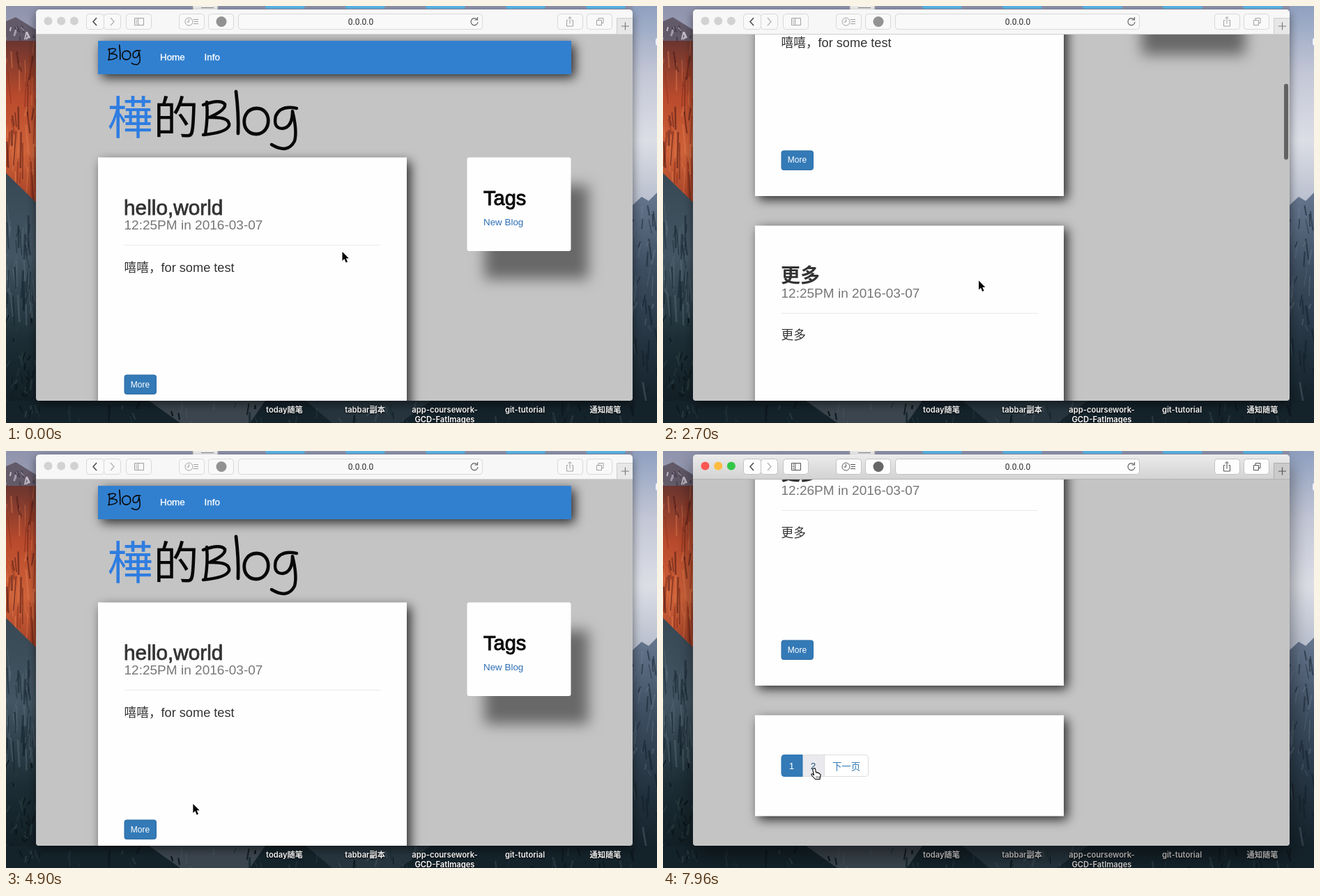
These frames come from a looping animation (934x599 px, 8000 ms). An HTML page with a canvas:

```html
<!DOCTYPE html>
<html lang="zh">
<head>
<meta charset="utf-8">
<title>Blog</title>
<style>
  html, body { margin: 0; width: 100%; height: 100%; overflow: hidden; }
  canvas { display: block; }
</style>
</head>
<body>
<canvas id="stage" width="934" height="599"></canvas>
<script>
const ctx = document.getElementById('stage').getContext('2d');
const CJK = '"Noto Sans CJK SC", "Noto Sans CJK TC", "Noto Sans CJK JP", sans-serif';
const SANS = '"Liberation Sans", ' + CJK;
const LOOP = 8000, ACTIVE_AT = 7750;
const LINK = '#337ab7';

// Stepped motion: [start, end, steps, value, easing power]
const SCROLL = [
  [0, 0, 1, [0]],
  [1290, 1580, 5, [33]],
  [1720, 2500, 8, [300]],
  [2590, 2880, 4, [700], 4.18],
  [3270, 3970, 7, [0], 3.13],
  [5780, 5950, 2, [865.5], 1.5],
  [6040, 6510, 6, [1938], 0.55],
];
const POINTER = [
  [0, 0, 1, [482.5, 353]],
  [480, 480, 1, [475, 359]],
  [630, 630, 1, [453, 394.5]],
  [4210, 4390, 3, [277, 503]],
  [4900, 5360, 9, [199.5, 538]],
  [6630, 6720, 2, [230, 432]],
  [6950, 7510, 11, [214, 455]],
];

function track(segments, t) {
  let value = segments[0][3];
  for (const [start, end, steps, target, power = 1] of segments) {
    if (t < start) break;
    const step = t >= end ? steps : 1 + Math.floor((t - start) / (end - start) * (steps - 1));
    const u = (step / steps) ** power;
    value = value.map((v, i) => v + (target[i] - v) * u);
  }
  return value;
}

function text(str, x, y, size, color, { family = SANS, weight = 400, align = 'left', thicken = 0 } = {}) {
  ctx.font = `${weight} ${size}px ${family}`;
  ctx.textAlign = align;
  ctx.fillStyle = ctx.strokeStyle = color;
  ctx.fillText(str, x, y);
  if (thicken) {
    ctx.lineWidth = thicken;
    ctx.strokeText(str, x, y);
  }
}

function box(x, y, w, h, r, fill, stroke) {
  ctx.beginPath();
  ctx.roundRect(x, y, w, h, r);
  if (fill) { ctx.fillStyle = fill; ctx.fill(); }
  if (stroke) { ctx.strokeStyle = stroke; ctx.lineWidth = 1; ctx.stroke(); }
}

function shadowBox(x, y, w, h, r, fill, dx = 5, dy = 5, blur = 15, color = '#2a2a2a') {
  ctx.save();
  Object.assign(ctx, { shadowOffsetX: dx, shadowOffsetY: dy, shadowBlur: blur, shadowColor: color });
  box(x, y, w, h, r, fill);
  ctx.restore();
}

function line(d, color, width = 1) {
  ctx.strokeStyle = color;
  ctx.lineWidth = width;
  ctx.stroke(new Path2D(d));
}

function shape(d, color) {
  ctx.fillStyle = color;
  ctx.fill(new Path2D(d));
}

function vertical(y0, y1, ...colors) {
  const g = ctx.createLinearGradient(0, y0, 0, y1);
  colors.forEach((c, i) => g.addColorStop(i / (colors.length - 1), c));
  return g;
}

function circle(x, y, r, color) {
  box(x - r, y - r, 2 * r, 2 * r, r, color);
}

function lettering(x, y, scale) {
  ctx.save();
  ctx.translate(x, y);
  ctx.scale(scale, scale);
  ctx.lineCap = ctx.lineJoin = 'round';
  line('M8 18Q10 40 6 64M3 22Q27 13 34 21Q36 29 12 40Q42 39 40 52Q36 62 3 65', '#080808', 4.5);
  line('M50 3Q54 35 53 63M79 27C56 28 56 64 79 64C102 63 102 26 79 27', '#080808', 4.8);
  line('M137 27Q114 22 107 38Q103 56 117 56Q131 54 131 31Q138 60 134 74Q124 93 101 79', '#080808', 4.5);
  ctx.restore();
}

function streaks(random, count, x, y, w, h, length, colors) {
  for (let i = 0; i < count; i++) {
    const sx = x + random() * w, sy = y + random() * h, len = length * (0.3 + random());
    line(`M${sx} ${sy}l${(random() - 0.5) * 10} ${len}`, colors[i % colors.length], 1 + random() * 2);
  }
}

function wallpaper() {
  let seed = 7;
  const random = () => (seed = seed * 16807 % 2147483647) / 2147483647;
  ctx.fillStyle = vertical(0, 599, '#8f93ac', '#b4b9ca', '#55677a', '#1d303b', '#101d24');
  ctx.fillRect(0, 0, 934, 599);

  shape('M0 22L14 16L43 34V70H0Z', '#635a69');
  streaks(random, 14, 0, 18, 43, 30, 10, ['#a39bae', '#4b4351', '#c7bfca']);
  ctx.fillStyle = vertical(50, 290, '#6b352f', '#b94a2c', '#cf6239', '#9e3d24');
  ctx.fillRect(0, 50, 43, 240);
  streaks(random, 50, 0, 50, 43, 190, 42, ['rgba(75,26,22,.55)', 'rgba(226,125,80,.45)', 'rgba(142,48,27,.6)']);
  shape('M0 240L43 282V599H0Z', vertical(240, 599, '#384855', '#435562', '#1c2d35', '#0e1a20'));
  streaks(random, 45, 0, 285, 40, 150, 36, ['rgba(20,35,45,.55)', 'rgba(104,122,135,.35)']);
  streaks(random, 40, 0, 435, 43, 155, 12, ['#0c171c', '#24363a']);

  ctx.fillStyle = vertical(0, 290, '#8fa0c0', '#c3c7d6', '#dcdee6', '#b5bccb');
  ctx.fillRect(899, 0, 35, 290);
  shape('M899 286L912 274L922 280L934 268V599H899Z', vertical(270, 599, '#66768e', '#3d4d60', '#22323e', '#0f1c23'));
  streaks(random, 40, 899, 285, 35, 265, 24, ['rgba(15,28,38,.5)', 'rgba(117,132,150,.3)']);

  ctx.fillStyle = '#14222a';
  ctx.fillRect(0, 567, 934, 32);
  shape('M205 567H372L350 599H250Z', '#3b454d');
  shape('M430 567H610L565 599H468Z', '#26343d');
  streaks(random, 70, 0, 567, 934, 30, 14, ['#0d181e', 'rgba(90,105,115,.28)', '#1c2d34']);

  // Desktop icons peeking out around the window
  for (let i = 0; i < 5; i++) box(372.5 + i * 115, -4, 56, 8, 1, '#5bb8ea');
  box(268, -4, 36, 12, 0, '#f2f2f2', '#aaa');
  line('M280 2.5H298', '#888');
  box(932, 46, 6, 11, 3, '#eef');
}

function labels(active) {
  const color = active ? '#d6d6d6' : '#fff';
  const names = [['today随笔', 399.5], ['tabbar副本', 515], ['app-coursework-', 629.5],
    ['git-tutorial', 744.5], ['通知随笔', 860], ['GCD-FatImages', 629.5, 598]];
  ctx.save();
  Object.assign(ctx, { shadowColor: '#000', shadowBlur: 3, shadowOffsetY: 1 });
  for (const [name, x, y = 584] of names)
    text(name, x, y, 11.2, color, { family: 'Inter, ' + CJK, weight: 600, align: 'center' });
  ctx.restore();
}

function post(index) {
  const y = 217.5 + index * 420;
  shadowBox(132, y, 443, 377.5, 0, '#fefefe');
  const first = index === 0;
  text(first ? 'hello,world' : '更多', 169, y + 82, first ? 29.8 : 28, '#333',
    first ? { thicken: 0.8 } : { weight: 700 });
  text(`12:${index < 4 ? 25 : 26}PM in 2016-03-07`, 169.5, y + 103.5, 19.05, '#777');
  line(`M169.5 ${y + 126}H537.5`, '#e9e9e9');
  text(first ? '嘻嘻，' : '更多', 169.5, y + 164, 17.7, '#333');
  if (first) text('for some test', 222.5, y + 164, 18.2, '#333');
  box(170, y + 312.5, 45.5, 27.5, 3, LINK, '#2e6da4');
  text('More', 192.5, y + 330, 12, '#fff', { align: 'center' });
}

function pagination(hover) {
  const y = 2317.5;
  shadowBox(132, y, 443, 145, 0, '#fefefe');
  box(170, y + 57, 124.5, 31, 4, '#fff', '#ddd');
  if (hover) box(200, y + 57, 31.5, 31, 0, '#eaeaee', '#ddd');
  line(`M231.5 ${y + 57}v31`, '#ddd');
  box(170, y + 57, 30, 31, [4, 0, 0, 4], LINK, LINK);
  text('1', 184.5, y + 77.5, 13.5, '#fff', { align: 'center' });
  text('2', 215.5, y + 77.5, 13.5, hover ? '#23527c' : LINK, { align: 'center' });
  text('下一页', 263, y + 78, 13.4, LINK, { align: 'center' });
}

function page(scroll, hover) {
  ctx.save();
  ctx.beginPath();
  ctx.roundRect(43, 40, 856, 527, [0, 0, 4, 4]);
  ctx.clip();
  ctx.fillStyle = '#c4c4c4';
  ctx.fillRect(43, 40, 856, 527);
  ctx.translate(0, -scroll);

  shadowBox(132, 50, 679, 48, 0, '#3180d0');
  lettering(145.5, 55, 0.345);
  text('Home', 221, 78, 13.4, '#fff', { thicken: 0.3 });
  text('Info', 284.5, 78, 13.4, '#fff', { thicken: 0.3 });

  text('樺', 145.5, 183.5, 65, '#2f7de1', { family: CJK });
  text('的', 211.5, 183.5, 65, '#080808', { family: CJK });
  lettering(280, 120, 1);

  shadowBox(661.5, 217.5, 149, 134.5, 3, '#fefefe', 25, 40, 20, 'rgba(0,0,0,.47)');
  text('Tags', 685, 286, 29, '#0a0a0a', { thicken: 0.9 });
  text('New Blog', 685, 315, 13.4, '#2d6fb5');

  for (let i = 0; i < 5; i++) post(i);
  pagination(hover);
  ctx.restore();
}

function toolbar(active) {
  const ink = active ? '#505050' : '#a0a0a0';
  const fill = active ? '#fdfdfd' : '#f9f9f9', edge = active ? '#c2c2c2' : '#d8d8d8';
  box(43, 5, 856, 35.5, [5, 5, 0, 0], active ? vertical(5, 40, '#ebebeb', '#d3d3d3') : '#f7f7f7');
  line('M43 40.5H899', active ? '#b3b3b3' : '#d0d0d0');

  ['#fc5753', '#fdbc40', '#33c748'].forEach((c, i) => circle(60.5 + 18.7 * i, 21.5, 6, active ? c : '#d2d2d2'));
  const buttons = [[115.5, 25], [140.5, 24], [172.5, 36], [248.5, 36], [290.5, 36], [333.5, 350], [791.5, 36], [833.5, 36]];
  for (const [x, w] of buttons) box(x, 11.5, w, 22, 4, fill, edge);

  line('M130 17l-5 5.5l5 5.5', '#484848', 1.5);
  line('M150 17l5 5.5l-5 5.5', '#b5b5b5', 1.4);
  line('M184.5 17.5h13v10h-13zM189.5 17.5v10M186 20h2M186 22.5h2M186 25h2', ink);
  line('M268 22.5a5.5 5.5 0 1 0 -11 0a5.5 5.5 0 1 0 11 0M262.5 19v4h-3M269 19.5h7M270 22.5h6M269 25.5h7', ink);
  circle(309, 22.5, 7.5, active ? '#666' : '#929292');
  text('0.0.0.0', 509, 27, 12, '#2b2b2b', { family: 'Roboto, sans-serif', align: 'center' });
  line('M675.5 19a5 5 0 1 0 1.5 4M676.5 16v4h-4', '#606060', 1.2);
  line('M806.5 20.5h-2v8.5h9v-8.5h-2M809 25.5v-10M806.5 18l2.5-2.5l2.5 2.5', ink);
  line('M847.5 20.5h7v7h-7zM850 20v-2.5h7v7h-2.5', ink);

  box(877, 17, 22, 23, 0, active ? '#cbcbcb' : '#e7e7e7');
  line('M876.5 40V17.5H899', active ? '#aeaeae' : '#cfcfcf');
  line('M883 29H894M888.5 23.5V34.5', active ? '#555' : '#7b7b7b', 1.2);
}

function scrollbar(scroll, t) {
  const visible = (on, off) => t < on ? 0 : Math.max(0, Math.min(1, (off - t) / 165));
  const alpha = Math.max(visible(1290, 4670), visible(5780, 7510));
  if (alpha) box(891, 43 + scroll * 0.2137, 6, 109, 3, `rgba(0,0,0,${0.5 * alpha})`);
}

function pointer(x, y, hand) {
  ctx.save();
  ctx.translate(x, y);
  ctx.lineJoin = 'round';
  if (hand) {
    const d = 'M2 1Q4 0 4.6 2L5.6 7Q7.5 6 8 7.5Q10 7 10.3 8.7Q12.4 8.6 12 11L11 16.5H4.5L-1 10.5Q-1.5 8 1 9L2.5 10.5L.7 2.5Z';
    shape(d, '#fff');
    line(d, '#000', 1.1);
    line('M6 12v3M8 12v3M10 12v3', '#333', 0.7);
  } else {
    const d = 'M0 0V13L3 10.2L5.2 15.5L7.5 14.5L5.3 9.4H9.3Z';
    line(d, '#fff', 2.2);
    shape(d, '#000');
  }
  ctx.restore();
}

function draw() {
  const t = performance.now() % LOOP;
  const active = t >= ACTIVE_AT;
  const [scroll] = track(SCROLL, t);
  const [x, y] = track(POINTER, t);
  wallpaper();
  labels(active);
  shadowBox(43, 5, 856, 562, 5, '#c4c4c4', 0, active ? 12 : 5, active ? 28 : 14, 'rgba(0,0,0,.5)');
  page(scroll, active);
  toolbar(active);
  scrollbar(scroll, t);
  pointer(x, y, active);
  requestAnimationFrame(draw);
}
draw();
</script>
</body>
</html>
```
